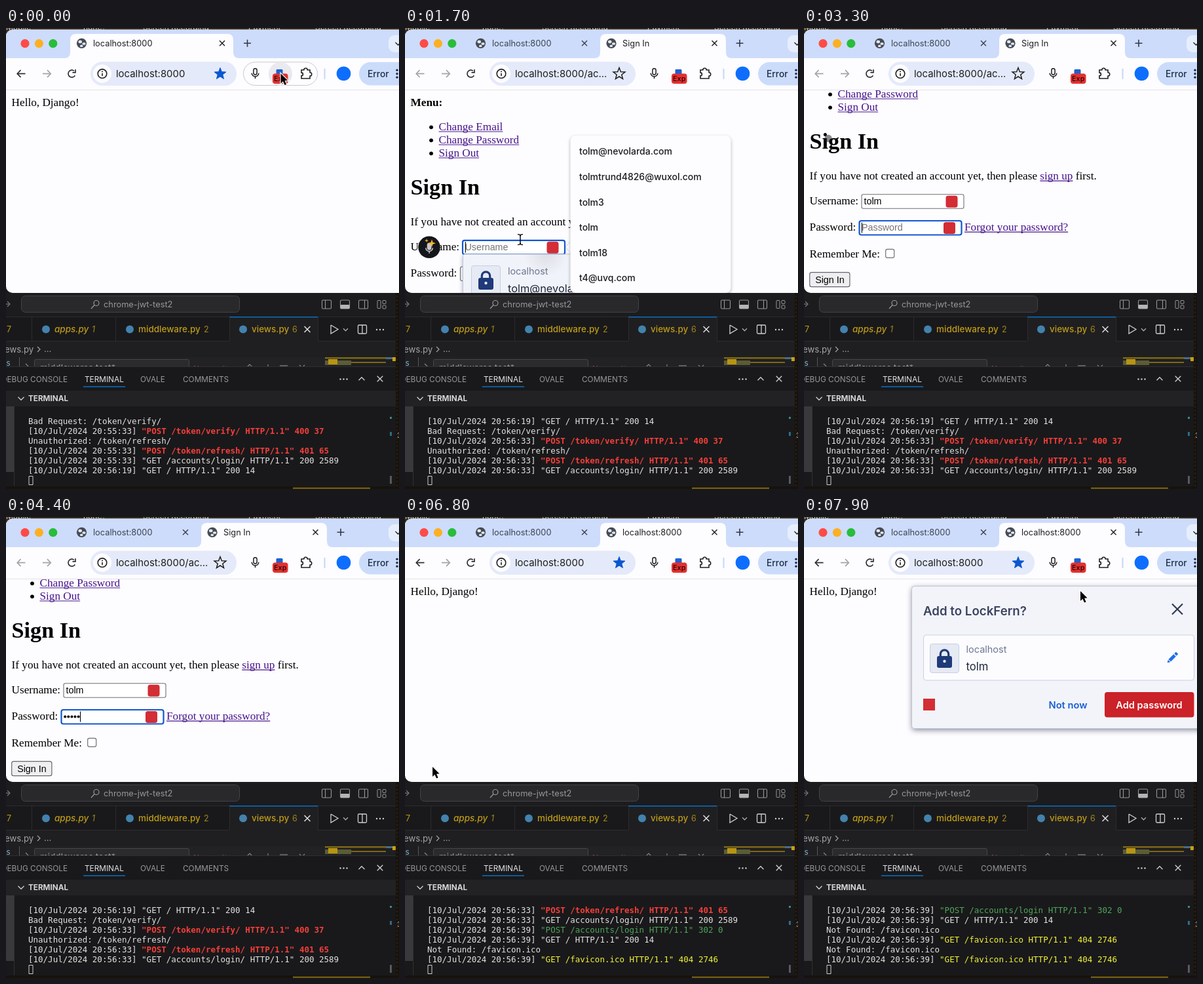
An HTML page with a canvas for the animation above (8000 ms loop, 600 by 703 pixels).

```html
<!DOCTYPE html>
<html lang="en">
<head>
<meta charset="utf-8">
<title>Sign-in demo</title>
<style>
html, body { margin: 0; width: 100%; height: 100%; overflow: hidden; background: #181818; }
canvas { display: block; width: 600px; height: 703px; }
</style>
</head>
<body>
<canvas id="stage"></canvas>
<script>
const W = 600, H = 703, LOOP = 8000, STEP = 100, TAU = Math.PI * 2;
const canvas = document.getElementById('stage');
const ctx = canvas.getContext('2d');
const dpr = window.devicePixelRatio || 1;
canvas.width = W * dpr;
canvas.height = H * dpr;

const UI = 'Inter, "Liberation Sans", sans-serif';
const SERIF = '"Liberation Serif", serif';
const SANS = '"Liberation Sans", sans-serif';
const MONO = '"DejaVu Sans Mono", monospace';
const PAGE = '#fdfcff', INK = '#1f1f1f', LINK = '#47148a', RED = '#d32d35';
const USER = 'tolm';

// Event times in ms
const T = { tab: 500, page: 700, focus: 1300, drop: 1500, scroll: 1700, type: 2400, pass: 3100,
  dots: 3500, hand: 5600, login: 6400, icon: 7000, prompt: 7300 };

// ---------- helpers ----------
function txt(s, x, y, font, color, align = 'left') {
  ctx.font = font;
  ctx.fillStyle = color;
  ctx.textAlign = align;
  ctx.fillText(s, x, y);
}
function box(x, y, w, h, r, fill, stroke, lw = 1) {
  ctx.beginPath();
  ctx.roundRect(x, y, w, h, r);
  if (fill) { ctx.fillStyle = fill; ctx.fill(); }
  if (stroke) { ctx.strokeStyle = stroke; ctx.lineWidth = lw; ctx.stroke(); }
}
function dot(x, y, r, fill, stroke, lw = 1.5) {
  ctx.beginPath();
  ctx.arc(x, y, r, 0, TAU);
  if (fill) { ctx.fillStyle = fill; ctx.fill(); }
  if (stroke) { ctx.strokeStyle = stroke; ctx.lineWidth = lw; ctx.stroke(); }
}
function line(color, lw, ...p) {
  ctx.beginPath();
  for (let i = 0; i < p.length; i += 2) ctx.lineTo(p[i], p[i + 1]);
  ctx.strokeStyle = color;
  ctx.lineWidth = lw;
  ctx.stroke();
}
function burst(x, y, outer, inner, points) {
  ctx.beginPath();
  for (let i = 0; i < points * 2; i++) {
    const a = i * Math.PI / points - Math.PI / 2, r = i % 2 ? inner : outer;
    ctx.lineTo(x + r * Math.cos(a), y + r * Math.sin(a));
  }
  ctx.closePath();
}
function cross(x, y, r, color, lw = 1.5) {
  line(color, lw, x - r, y - r, x + r, y + r);
  line(color, lw, x - r, y + r, x + r, y - r);
}
function chevron(x, y, r, color, dir = 1) {
  line(color, 1.3, x - r, y - dir * r / 2, x, y + dir * r / 2, x + r, y - dir * r / 2);
}
function more(x, y, color) {
  for (let i = -1; i < 2; i++) dot(x + i * 5, y, 1.2, color);
}
function clipTo(x, y, w, h, r, draw) {
  ctx.save();
  ctx.beginPath();
  ctx.roundRect(x, y, w, h, r);
  ctx.clip();
  draw();
  ctx.restore();
}
function shaded(blur, color, draw) {
  ctx.save();
  ctx.shadowColor = color;
  ctx.shadowBlur = blur * dpr;
  ctx.shadowOffsetY = 2 * dpr;
  draw();
  ctx.restore();
}
const ease = (t, a, b) => {
  const k = Math.min(1, Math.max(0, (t - a) / (b - a)));
  return k * k * (3 - 2 * k);
};
const mix = (a, b, k) => a + (b - a) * k;

// ---------- editor ----------
const GET = (at, q, c) => ['[10/Jul/2024 20:' + at + '] ', '"' + q, c];
const LOG = [
  ['Bad Request: /token/verify/'],
  GET('55:33', 'POST /token/verify/ HTTP/1.1" 400 37', 'red'),
  ['Unauthorized: /token/refresh/'],
  GET('55:33', 'POST /token/refresh/ HTTP/1.1" 401 65', 'red'),
  GET('55:33', 'GET /accounts/login/ HTTP/1.1" 200 2589'),
  GET('56:19', 'GET / HTTP/1.1" 200 14'),
  ['Bad Request: /token/verify/'],
  GET('56:33', 'POST /token/verify/ HTTP/1.1" 400 37', 'red'),
  ['Unauthorized: /token/refresh/'],
  GET('56:33', 'POST /token/refresh/ HTTP/1.1" 401 65', 'red'),
  GET('56:33', 'GET /accounts/login/ HTTP/1.1" 200 2589'),
  GET('56:39', 'POST /accounts/login HTTP/1.1" 302 0', 'green'),
  GET('56:39', 'GET / HTTP/1.1" 200 14'),
  ['Not Found: /favicon.ico'],
  GET('56:39', 'GET /favicon.ico HTTP/1.1" 404 2746', 'yellow'),
  ['Not Found: /favicon.ico'],
  GET('56:39', 'GET /favicon.ico HTTP/1.1" 404 2746', 'yellow')
];
const TINT = { red: '#f43f3a', green: '#4fa65a', yellow: '#f2f238' };

function terminal(t) {
  const end = t < T.page ? 6 : t < T.login ? 11 : t < T.icon ? 15 : 17;
  LOG.slice(end - 6, end).forEach(([head, tail, tint], i) => {
    const y = 604 + i * 15, font = '12.5px ' + MONO;
    txt(head, 34, y, font, '#e2e2e2');
    if (tail) txt(tail, 34 + ctx.measureText(head).width, y, (tint === 'red' ? 'bold ' : '') + font, TINT[tint] || '#e2e2e2');
  });
  box(35, 683.5, 6, 13, 0, null, '#d0d0d0');
}

function editor(t) {
  box(0, 385, 595, 314, 0, '#19191b');
  box(0, 404, 595, 36, 0, '#1c1c1f');
  line('#77777b', 1.2, 0, 421, 6, 421);
  line('#77777b', 1.2, 2, 417, 6, 421, 2, 425);
  box(23.5, 408.5, 333, 25, 6, '#29292c', '#434347');
  dot(138, 419.5, 4, null, '#98989c', 1.2);
  line('#98989c', 1.2, 135, 422.5, 130, 428);
  txt('chrome-jwt-test2', 149, 425.7, '12.8px ' + UI, '#97979b');
  for (const x of [489, 517, 545]) box(x - 6.5, 415, 14, 13, 1.5, null, '#97979b', 1.1);
  line('#97979b', 1.1, 487.5, 415, 487.5, 428);
  box(510.5, 422, 14, 6, 1, '#b5b5b9');
  line('#97979b', 1.1, 547.5, 415, 547.5, 428);
  box(567, 415.5, 5, 12, 1, null, '#97979b');
  box(575, 415.5, 5, 5, 1, null, '#97979b');
  box(575, 423, 5, 5, 1, null, '#97979b');

  // file tabs
  const tab = '500 13.5px ' + UI, gold = '#bf9c17';
  line('#2c2c2f', 1, 0, 440.5, 595, 440.5);
  box(341, 440, 135, 60, 0, '#1f1f21');
  box(0, 478, 595, 39, 0, '#1f1f21');
  line('#2c2c2f', 1, 0, 477.5, 341, 477.5);
  line('#2c2c2f', 1, 476, 477.5, 595, 477.5);
  line('#0a70c4', 1.5, 341, 440.8, 476, 440.8);
  for (const x of [39.5, 167.5, 341.5, 476.5]) line('#2c2c2f', 1, x, 441, x, 477);
  for (const x of [61, 189, 362]) dot(x, 459.5, 6, '#4382ad');
  txt('7', 1, 464, '12.5px ' + UI, gold);
  txt('apps.py', 74, 464, 'italic ' + tab, gold);
  txt('1', 131, 464, 'italic 12.5px ' + UI, '#a38717');
  txt('middleware.py', 202, 464, tab, gold);
  txt('2', 302, 464, '12.5px ' + UI, '#a38717');
  txt('views.py', 375, 464, tab, gold);
  txt('6', 437, 464, '12.5px ' + UI, '#a38717');
  cross(460, 459.5, 4.5, '#e2e2e2', 1.4);
  line('#cfcfd2', 1.3, 496, 453, 507, 459.5, 496, 466, 496, 453);
  chevron(518.5, 460, 3.5, '#aaaaae');
  box(537.5, 453, 13, 13, 1.5, null, '#cfcfd2', 1.3);
  line('#cfcfd2', 1.3, 544, 453, 544, 466);
  more(571, 460, '#cfcfd2');

  // breadcrumb and cut-off find bar
  txt('ews.py', -2, 494.7, '13.2px ' + UI, '#a3a3a7');
  line('#a3a3a7', 1.2, 48, 486, 52, 490, 48, 494);
  txt('...', 58, 494, '13.2px ' + UI, '#a3a3a7');
  clipTo(0, 500, 595, 16, 0, () => {
    txt('s', 0, 515, '12px ' + MONO, '#7fb2d4');
    line('#58585b', 1, 20.5, 502, 20.5, 517);
    box(23, 502, 464, 20, 0, '#222224');
    line('#88888c', 1.2, 30, 512, 34, 516, 30, 520);
    box(43.5, 505.5, 236, 22, 2, '#2b2b2e', '#47474b');
    txt('middlewares test*', 52, 522.5, '13.5px ' + UI, '#a0a0a4');
    txt('No results', 286, 523.5, '12px ' + UI, '#b04a4d');
    line('#88888c', 1.2, 368, 517, 372, 513, 376, 517);
    line('#88888c', 1.2, 400, 513, 400, 518);
    line('#88888c', 1.2, 418, 515, 430, 515);
    cross(452, 518, 4, '#88888c', 1.2);
    box(487, 502, 93, 2.5, 0, '#7c6717');
    box(487, 507, 40, 7, 0, '#5b5c36');
    box(492, 505, 14, 8, 0, '#b89414');
    box(527, 509, 53, 2, 0, '#7c6717');
    box(580, 502, 15, 3, 0, '#4a6c86');
    box(590, 502, 5, 6, 0, '#c6a012');
  });

  // panel
  box(0, 517, 595, 182, 0, '#19191b');
  line('#2f2f32', 1, 0, 516.5, 595, 516.5);
  const cap = '11.8px ' + UI;
  txt('DEBUG CONSOLE', 94, 539.5, cap, '#98989c', 'right');
  txt('TERMINAL', 120, 539.5, cap, '#e4e4e6');
  txt('OVALE', 205, 539.5, cap, '#98989c');
  txt('COMMENTS', 270, 539.5, cap, '#98989c');
  line('#0a70c4', 1.3, 118, 547, 182, 547);
  more(515.5, 535.5, '#cfcfd2');
  chevron(543, 535, 4.5, '#cfcfd2', -1);
  cross(571, 535, 4.3, '#cfcfd2', 1.3);
  box(0, 553, 595, 24, 0, '#222225');
  chevron(23, 565, 4.5, '#cfcfd2');
  txt('TERMINAL', 34, 569, 'bold 11.7px ' + UI, '#d6d6d9');
  box(0, 577, 12, 100, 0, '#39393c');
  line('#303033', 1, 12.5, 577, 12.5, 699);
  terminal(t);
  box(586, 593, 3, 3, 0, '#3e8a8c');
  box(586, 616, 3, 6, 0, '#2f6c86');
  box(586, 683, 3, 12, 0, '#5a5a5e');
}

function backdrop() {
  box(0, 0, W, H, 0, '#17120c');
  box(0, 0, W, 12, 0, '#352a1b');
  const font = '12px ' + UI;
  [['Mobile', 0], ['none?', 118], ['Screen Recording', 209], ['Payment', 370], ['Screen Recording', 472]]
    .forEach(([s, x]) => txt(s, x, 3, font, '#cfcbc2'));
  for (let y = 408; y < 700; y += 6) box(596 + (y * 7 % 3), y, 2, 3, 0, '#2b1f0f');
  txt('3', 597, 625, '10px ' + UI, '#bdb8ae');
  box(438, 700.5, 118, 3, 0, '#6d5a12');
}

// ---------- browser chrome ----------
function globe(x, y) {
  dot(x, y, 7.6, '#474b52');
  box(x - 5, y - 4.5, 5.5, 4.5, 2, '#dfe6f5');
  box(x + 1, y - 1, 5, 3.5, 1.5, '#dfe6f5');
  box(x - 2.5, y + 2.5, 4.5, 3.2, 1.5, '#dfe6f5');
}
function star(x, y, full) {
  burst(x, y + .5, 9.4, 4, 5);
  if (full) { ctx.fillStyle = '#0b57d0'; ctx.fill(); }
  ctx.strokeStyle = full ? '#0b57d0' : INK;
  ctx.lineWidth = full ? 1 : 1.5;
  ctx.stroke();
}
function mic(x, y, color, fill) {
  box(x - 2.6, y - 8, 5.2, 9.5, 2.6, fill, color, 1.5);
  ctx.beginPath();
  ctx.arc(x, y - 1, 5.3, 0, Math.PI);
  ctx.strokeStyle = color;
  ctx.stroke();
  line(color, 1.5, x, y + 4.3, x, y + 7.5);
}
function arrow(x, y, dir, color) {
  line(color, 1.7, x - 6 * dir, y, x + 6 * dir, y);
  line(color, 1.7, x + dir, y - 5.5, x + 6.3 * dir, y, x + dir, y + 5.5);
}
function pageTab(x0, x1) {
  ctx.beginPath();
  ctx.moveTo(x0 - 9, 46);
  ctx.quadraticCurveTo(x0, 46, x0, 37);
  ctx.lineTo(x0, 18);
  ctx.quadraticCurveTo(x0, 9, x0 + 9, 9);
  ctx.lineTo(x1 - 9, 9);
  ctx.quadraticCurveTo(x1, 9, x1, 18);
  ctx.lineTo(x1, 37);
  ctx.quadraticCurveTo(x1, 46, x1 + 9, 46);
  ctx.fillStyle = PAGE;
  ctx.fill();
}

function browserTop(t) {
  const two = t >= T.tab, hello = !two || t >= T.login, tabFont = '12.8px ' + UI;
  box(0, 2, W, 45, 0, '#cddcfb');
  ['#fe4b47', '#fdb022', '#28bd3a'].forEach((c, i) => dot(29 + i * 21.4, 23.7, 6.6, c));
  pageTab(two ? 298 : 98, two ? 490 : 347);
  globe(115.5, 23.3);
  txt('localhost:8000', 133, 27.6, tabFont, two ? '#3c4254' : INK);
  if (two) {
    cross(274, 23.3, 4, '#3c4254');
    globe(315, 23.3);
    txt(hello ? 'localhost:8000' : t < T.page ? 'New Tab' : 'Sign In', 332, 27.6, tabFont, INK);
  }
  cross(two ? 472.5 : 330, 23.3, 4, INK);
  const px = two ? 511 : 368.5;
  line('#32384a', 1.6, px - 5.5, 23.3, px + 5.5, 23.3);
  line('#32384a', 1.6, px, 17.8, px, 28.8);
  box(584, 11, 30, 26, 9, '#e6eefd');
  chevron(598.5, 24, 4, INK);

  // toolbar
  box(0, 46, W, 49, 0, PAGE);
  arrow(23.5, 69.7, -1, hello ? '#303134' : '#a3a5a9');
  arrow(62, 69.7, 1, '#a3a5a9');
  ctx.beginPath();
  ctx.arc(100.5, 69.7, 5.5, 0.5, 5.4);
  ctx.strokeStyle = '#303134';
  ctx.lineWidth = 1.7;
  ctx.stroke();
  line('#303134', 1.7, 106, 63.3, 106, 67.8, 101.5, 67.8);
  box(129, 51.5, 223, 36.5, 18, '#e4eafa');
  dot(147, 69.7, 14, PAGE);
  dot(147, 69.7, 6.8, null, INK, 1.6);
  line(INK, 1.6, 147, 69, 147, 73.3);
  dot(147, 66.5, 1, INK);
  txt(hello ? 'localhost:8000' : t < T.page ? '' : 'localhost:8000/ac...', 168, 75, '14.9px ' + UI, INK);
  star(327, 69.5, hello);
  if (t < T.tab) {
    box(362.5, 52, 113, 35.5, 18, null, '#c9c9cf');
    dot(419, 70, 18, '#e9e9ee');
  }
  mic(380.5, 69.7, INK);
  box(412.5, 63, 10, 10, 1.5, '#1a62cf');
  box(407, 69.5, 23.5, 15.5, 4, '#e5302f');
  txt('Exp', 418.7, 81.3, '500 10.8px ' + UI, '#240606', 'center');
  ctx.beginPath();
  ctx.moveTo(451, 64);
  ctx.arc(457.5, 64, 2.7, Math.PI, 0);
  ctx.lineTo(464, 64);
  ctx.arc(464, 70.5, 2.7, -Math.PI / 2, Math.PI / 2);
  ctx.lineTo(464, 77);
  ctx.lineTo(451, 77);
  ctx.arc(451, 70.5, 2.4, Math.PI / 2, -Math.PI / 2, true);
  ctx.closePath();
  ctx.strokeStyle = INK;
  ctx.lineWidth = 1.6;
  ctx.stroke();
  line('#c5d8f8', 2, 486.5, 62, 486.5, 78);
  dot(515.5, 69.5, 10.8, '#0d6efd');
  box(539, 52, 90, 35.5, 18, '#cbdcfb');
  txt('Error', 552, 74.8, '500 13.8px ' + UI, '#1c2b4a');
  for (let i = -1; i < 2; i++) dot(597, 69.7 + i * 5.5, 1.7, '#1c2b4a');
  line('#e4e3e9', 1, 0, 94.5, W, 94.5);
}

// ---------- page ----------
const BODY = '17.2px ' + SERIF, FIELD = '14.3px ' + SANS;

function link(s, x, y) {
  txt(s, x, y, BODY, LINK);
  line(LINK, 1.2, x, y + 2.2, x + ctx.measureText(s).width, y + 2.2);
}
function field(x, y, focused) {
  if (focused) box(x, y, 156, 21.5, 3, '#fff', '#1257cf', 2.2);
  else box(x, y, 156, 21.5, 2.5, '#fff', '#6f6f74', 1.1);
  box(x + 128.5, y + 2, 18, 18, 3.5, RED);
}
const caretOn = (t, since) => Math.floor((t - since) / 500) % 2 === 0;

function lockTile(x, y) {
  box(x + .5, y + .5, 44, 44, 3.5, '#e6eaf4', '#c6cfe2');
  box(x + 11, y + 19, 23, 18, 3, '#1f3a78');
  ctx.beginPath();
  ctx.arc(x + 22.5, y + 16, 6.2, Math.PI, 0);
  ctx.lineTo(x + 28.7, y + 20);
  ctx.moveTo(x + 16.3, y + 16);
  ctx.lineTo(x + 16.3, y + 20);
  ctx.strokeStyle = '#1f3a78';
  ctx.lineWidth = 3.2;
  ctx.stroke();
  dot(x + 22.5, y + 27, 2.2, '#e6eaf4');
}
function pencil(x, y) {
  ctx.save();
  ctx.translate(x, y);
  ctx.rotate(-Math.PI / 4);
  box(-6, -2.5, 11, 5, 0, '#1f6fe8');
  box(6.2, -2.5, 4, 5, 1.5, '#1f6fe8');
  ctx.beginPath();
  ctx.moveTo(-7, -2.5);
  ctx.lineTo(-11, 0);
  ctx.lineTo(-7, 2.5);
  ctx.fill();
  ctx.restore();
}

function vaultList(y) {
  shaded(6, 'rgba(30,40,70,.35)', () => box(88, y, 301, 226, 3, '#f1f3fa'));
  const g = ctx.createRadialGradient(215, y, 2, 215, y, 34);
  g.addColorStop(0, 'rgba(190,186,196,.35)');
  g.addColorStop(1, 'rgba(190,186,196,0)');
  clipTo(88, y, 301, 181, 0, () => {
    box(180, y, 70, 36, 0, g);
    [USER + '@nevolarda.com', USER + 'trund4826+10...', ''].forEach((s, i) => {
      const r = y + 17 + i * 68.5;
      lockTile(101, r);
      txt('localhost', 157, r + 14, '14.4px ' + UI, '#6d7790');
      txt(s, 157, r + 40.5, '16.4px ' + UI, '#1d2638');
      pencil(347, r + 21.5);
    });
  });
  line('#c9cfdf', 1, 88, y + 180.5, 389, y + 180.5);
  txt('More options...', 110, y + 209.3, '500 13.5px ' + UI, '#15181f');
  box(88.5, y, 300, 226, 3, null, '#c2c9da');
}

function autofill() {
  shaded(5, 'rgba(0,0,0,.3)', () => box(252.5, 164, 245, 240, 8, '#fdfcfe'));
  line('#d0d0d6', 1, 252, 326, 245, 334, 252, 342);
  ['@nevolarda.com', 'trund4826@wuxol.com', '3', '', '18'].map(s => USER + s).concat('t4@uvq.com')
    .forEach((s, i) => txt(s, 266, 193.4 + i * 38.6, '500 14px ' + UI, '#1c1c20'));
}

// k: size, square: how far the disc has turned into a rounded square
function bubble(x, y, k, square) {
  ctx.save();
  ctx.globalAlpha = k > .99 ? 1 : mix(.3, .9, k);
  const r = mix(16.8, 18, square) * k;
  box(x - r, y - r, 2 * r, 2 * r, mix(r, 12 * k, square), '#15161a');
  if (k > .6) {
    mic(x, y + 2, '#c9c9cd', '#c9c9cd');
    ctx.fillStyle = '#f5b62a';
    for (const [dx, dy, s] of [[4, -6, 6], [-4, -10, 3]]) {
      burst(x + dx, y + dy, s, s * .35, 4);
      ctx.fill();
    }
  }
  ctx.restore();
}

function signIn(t) {
  const moved = ease(t, T.scroll, T.scroll + 400);
  const scroll = t < T.type ? 166 * moved : 70;
  const inUser = t >= T.focus && t < T.pass, inPass = t >= T.pass && t < T.login - 200;
  const typed = Math.max(0, Math.min(4, Math.floor((t - T.type) / 120) + 1));
  const dots = Math.max(0, Math.min(10, Math.floor((t - T.dots) / 200) + 1));
  ctx.save();
  ctx.translate(0, -scroll);
  txt('Menu:', 8.6, 118.8, 'bold ' + BODY, '#000');
  ['Change Email', 'Change Password', 'Sign Out'].forEach((s, i) => {
    dot(40, 151.3 + i * 20, 2.9, '#000');
    link(s, 51.5, 155.8 + i * 20);
  });
  txt('Sign In', 8.6, 253.8, 'bold 34.2px ' + SERIF, '#000');
  const intro = 'If you have not created an account yet, then please ';
  txt(intro, 8.6, 301, BODY, '#000');
  const ix = 8.6 + ctx.measureText(intro).width;
  link('sign up', ix, 301);
  txt(' first.', ix + ctx.measureText('sign up').width, 301, BODY, '#000');

  txt('Username:', 8.6, 339, BODY, '#000');
  field(88, 323.8, inUser);
  txt(typed ? USER.slice(0, typed) : 'Username', 91.5, 339, FIELD, typed ? '#000' : '#757575');
  if (inUser && caretOn(t, typed ? T.type : T.focus)) {
    const cx = typed ? 92 + ctx.measureText(USER.slice(0, typed)).width : 92.3;
    line('#000', 1.1, cx, 326, cx, 342.5);
  }
  txt('Password:', 8.6, 379, BODY, '#000');
  field(84.5, 364, inPass);
  if (!dots) txt('Password', 88, 379.3, FIELD, '#757575');
  for (let i = 0; i < dots; i++) dot(90.2 + i * 5.1, 374.5, 2, '#000');
  if (inPass && caretOn(t, dots ? T.dots + (dots - 1) * 200 : T.pass)) {
    const cx = 88.3 + dots * 5.05;
    line('#000', 1.1, cx, 366.5, cx, 382.5);
  }
  link('Forgot your password?', 245, 379);
  txt('Remember Me:', 8.6, 420, BODY, '#000');
  box(124.7, 407.3, 13, 13, 2.5, '#fff', '#6f6f74', 1.2);
  const press = t >= T.login - 200;
  box(8.7, 442.7, 61.2, 22, 3, press ? '#dcdce0' : '#efeff1', '#66666b', 1.2);
  txt('Sign In', 39.4, 458.5, FIELD, '#000', 'center');
  if (t >= T.drop && t < T.type) vaultList(345);
  ctx.restore();
  if (t >= T.drop && t < T.scroll + STEP) autofill();
  if (t >= T.focus && t < T.pass + 300) {
    const k = t < T.pass ? 1 : 1 - (t - T.pass + 100) / 450;
    bubble(37, 334.3 - 166 * moved, k, t < T.pass ? moved : 0);
  }
}

function savePrompt() {
  shaded(9, 'rgba(20,25,50,.5)', () => box(165, 106, 460, 217, 4, '#f2f4fa'));
  box(164.5, 105.5, 460, 217, 4, null, '#c0c5d2');
  txt('Add to LockFern?', 182, 149.5, '600 18.7px ' + UI, '#3b4460');
  cross(570, 140.5, 8, '#2e3750', 2.2);
  box(182.5, 180, 413, 69, 4, '#fcfcff', '#c9d0e0');
  lockTile(192, 193);
  txt('localhost', 247.5, 207, '14.5px ' + UI, '#6d7790');
  txt(USER, 247.5, 234, '16.7px ' + UI, '#1d2638');
  pencil(562.5, 214.5);
  box(182, 277, 18, 18, 0, RED);
  txt('Not now', 403, 291.5, '600 14.7px ' + UI, '#1a5fd0', 'center');
  box(459, 267, 136.5, 38.5, 4, '#cb2128');
  txt('Add password', 527, 291.5, '600 14.6px ' + UI, '#fff', 'center');
}

// ---------- pointer ----------
function pointer(x, y) {
  const p = [0, 0, 0, 15, 3.4, 11.8, 6, 17.5, 8.6, 16.4, 6.1, 10.8, 10.6, 10.6];
  ctx.beginPath();
  for (let i = 0; i < p.length; i += 2) ctx.lineTo(x + p[i], y + p[i + 1]);
  ctx.closePath();
  ctx.strokeStyle = '#fff';
  ctx.lineWidth = 2.2;
  ctx.stroke();
  ctx.fillStyle = '#000';
  ctx.fill();
}
function beam(x, y) {
  line('#000', 1.4, x, y - 7, x, y + 7);
  for (const s of [-1, 1]) line('#000', 1.3, x - 4, y + 8 * s, x - 1, y + 7.5 * s, x, y + 6 * s, x + 1, y + 7.5 * s, x + 4, y + 8 * s);
}
function mouse(t) {
  if (t >= T.type && t < T.hand) return;
  if (t < T.type) {
    const k = ease(t, 600, T.focus);
    if (k === 1) beam(176, 322.7);
    else pointer(mix(419.5, 176, k), mix(69.5, 317, k));
  } else {
    const a = ease(t, T.hand, 6100), b = ease(t, 7000, 7800);
    pointer(mix(mix(176, 42, a), 422, b), mix(mix(318, 381, a), 113, b));
  }
}

// ---------- scene ----------
function draw(t) {
  ctx.setTransform(dpr, 0, 0, dpr, 0, 0);
  backdrop();
  editor(t);
  clipTo(0, 2.5, W + 12, 401.5, 10, () => {
    box(0, 2, W, 402, 0, PAGE);
    clipTo(0, 95, W, 309, 0, () => {
      if (t < T.tab || t >= T.login) txt('Hello, Django!', 8.6, 119, BODY, '#000');
      else if (t >= T.page) signIn(t);
      if (t >= T.prompt) savePrompt();
    });
    browserTop(t);
  });
  mouse(t);
}

const start = performance.now();
function frame() {
  const t = (performance.now() - start) % LOOP;
  draw(Math.floor(t / STEP) * STEP);
  requestAnimationFrame(frame);
}
frame();
</script>
</body>
</html>
```
